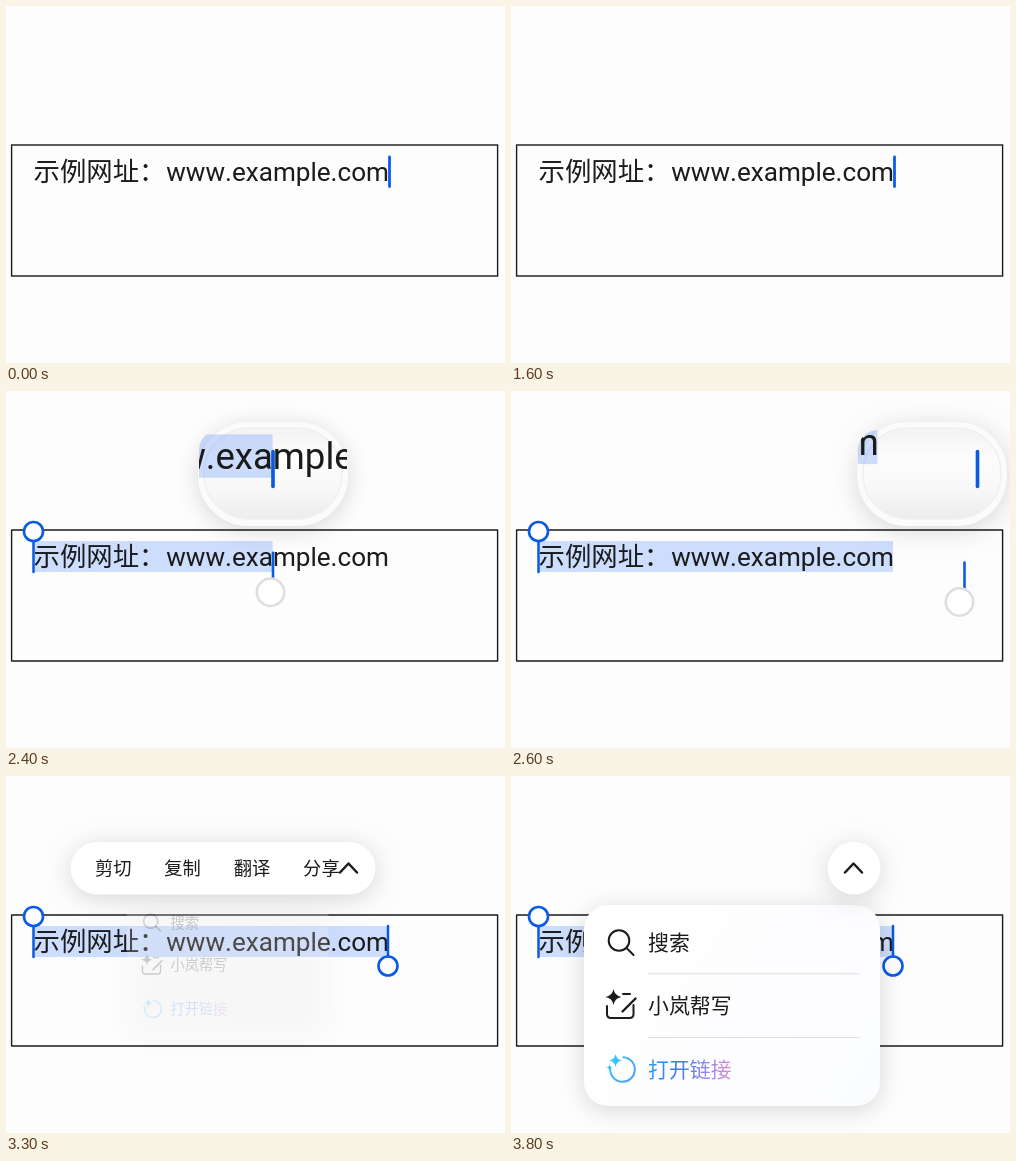
Animation, 499 px wide and 357 px high, one loop 4500 ms. Source, as an HTML page with a canvas:

```html
<!DOCTYPE html>
<html lang="zh">
<head>
<meta charset="utf-8">
<title>文本选择</title>
<style>
html, body { margin: 0; width: 100%; height: 100%; overflow: hidden; background: #fdfdfd; }
canvas { display: block; width: 499px; height: 357px; }
</style>
</head>
<body>
<canvas id="stage"></canvas>
<script>
const W = 499, H = 357, LOOP = 4500;
const BLUE = '#0a5ae6', INK = '#1b1b1b';
const CJK = '"Noto Sans CJK SC", "Noto Sans CJK", sans-serif';
const LATIN = 'Roboto, sans-serif';
const LEFT = 27.5, END = 382;
const LABEL = '示例网址：', LINK = 'www.example.com';

const canvas = document.getElementById('stage');
const c = canvas.getContext('2d');
const dpr = window.devicePixelRatio || 1;
canvas.width = W * dpr;
canvas.height = H * dpr;
c.fontKerning = 'none';

const clamp = (v, a, b) => Math.max(a, Math.min(b, v));
const mix = (a, b, k) => a + (b - a) * k;
const smooth = k => { k = clamp(k, 0, 1); return k * k * (3 - 2 * k); };

function layer(alpha, draw) {
  c.save();
  c.globalAlpha *= alpha;
  draw();
  c.restore();
}

function write(str, x, y, size, family, color = INK, weight = 400) {
  c.font = `${weight} ${size}px ${family}`;
  c.fillStyle = color;
  c.fillText(str, x, y);
}

function line(points, color, width) {
  c.beginPath();
  points.forEach(([x, y]) => c.lineTo(x, y));
  c.strokeStyle = color;
  c.lineWidth = width;
  c.lineCap = c.lineJoin = 'round';
  c.stroke();
}

function pill(x, y, w, h, r) {
  c.beginPath();
  c.roundRect(x, y, w, h, r);
}

function card(x, y, w, h, r, fill = '#fff') {
  layer(1, () => {
    c.shadowColor = 'rgba(0,0,0,0.15)';
    c.shadowBlur = 24 * dpr;
    c.shadowOffsetY = 4 * dpr;
    c.fillStyle = fill;
    pill(x, y, w, h, r);
    c.fill();
  });
}

function ring(x, y, r, color) {
  c.beginPath();
  c.arc(x, y, r, 0, 7);
  c.fillStyle = '#fff';
  c.fill();
  c.strokeStyle = color;
  c.lineWidth = 2.6;
  c.stroke();
}

function sentence() {
  write(LABEL, 27.5, 174.7, 26.4, CJK);
  write(LINK, 160.2, 174.5, 26.1, LATIN);
}

function highlight(end) {
  c.fillStyle = 'rgba(10,89,247,0.2)';
  c.fillRect(27, 150, end - 27, 31);
}

// Right edge of the last character reached by x.
function snap(x) {
  if (x < 160) return 27.5 + 26.4 * Math.max(2, Math.round((x - 27.5) / 26.4));
  c.font = `26.1px ${LATIN}`;
  let edge = 160;
  for (let i = 1; i <= LINK.length; i++) {
    const next = 160 + c.measureText(LINK.slice(0, i)).width;
    if (next <= x) edge = next;
  }
  return x >= END ? END : edge;
}

function startHandle() {
  line([[LEFT, 151], [LEFT, 181]], BLUE, 2.5);
  ring(LEFT, 140.5, 9.5, BLUE);
}

function endHandle(x) {
  line([[x, 150], [x, 180]], BLUE, 2.5);
  ring(x, 190, 9.5, BLUE);
}

function chevron(x, up) {
  const s = up ? 1 : -1;
  line([[x - 8.5, 92 + 4.5 * s], [x, 92 - 4.5 * s], [x + 8.5, 92 + 4.5 * s]], INK, 2.5);
}

function toolbar(left, right, labels, up = false, textAlpha = 1) {
  card(left, 66, right - left, 52.5, 26.2);
  c.save();
  pill(left, 66, right - left, 52.5, 26.2);
  c.clip();
  layer(textAlpha, () => labels.forEach((s, i) =>
    write(s, left + 24.3 + i * 69.4, 98.8, 18.3, CJK, INK, 500)));
  c.restore();
  chevron(right - 27, up);
}

function sparkle(x, y, r, color) {
  c.beginPath();
  c.moveTo(x, y - r);
  for (let i = 1; i <= 4; i++) {
    const a = i * Math.PI / 2 - Math.PI / 2;
    const m = a - Math.PI / 4;
    c.quadraticCurveTo(x + Math.cos(m) * r * 0.2, y + Math.sin(m) * r * 0.2,
      x + Math.cos(a) * r, y + Math.sin(a) * r);
  }
  c.fillStyle = color;
  c.fill();
}

function gradient(x0, y0, x1, y1, ...stops) {
  const g = c.createLinearGradient(x0, y0, x1, y1);
  stops.forEach((s, i) => g.addColorStop(i / (stops.length - 1), s));
  return g;
}

function searchIcon() {
  c.beginPath();
  c.arc(108, 164.5, 10.3, 0, 7);
  c.strokeStyle = INK;
  c.lineWidth = 2;
  c.stroke();
  line([[115.5, 172], [122.5, 179]], INK, 2);
}

function writeIcon() {
  c.beginPath();
  c.moveTo(112, 218);
  c.lineTo(119, 218);
  c.moveTo(122.5, 229);
  c.lineTo(122.5, 238);
  c.quadraticCurveTo(122.5, 242, 118.5, 242);
  c.lineTo(100, 242);
  c.quadraticCurveTo(96, 242, 96, 238);
  c.lineTo(96, 230);
  c.strokeStyle = INK;
  c.lineWidth = 2;
  c.stroke();
  line([[124.5, 222.5], [111.5, 235.5]], INK, 2.4);
  sparkle(102.5, 221, 8, INK);
}

function linkIcon() {
  const g = gradient(98, 282, 124, 304, '#38c8f4', '#4a9cf8');
  c.beginPath();
  c.arc(111.5, 293.5, 12.3, -1.5, 3.2);
  c.strokeStyle = g;
  c.lineWidth = 2;
  c.stroke();
  sparkle(104.5, 284.5, 6.5, '#38c4f4');
  sparkle(98.5, 291.5, 3, '#38c4f4');
}

function menu(scale) {
  c.translate(223, 104);
  c.scale(scale, scale);
  c.translate(-223, -104);
  card(73, 129, 296, 201, 24, gradient(73, 129, 369, 330, '#ffffff', '#fbfcff'));
  line([[137, 197.8], [348, 197.8]], '#dedede', 1);
  line([[137, 261.5], [348, 261.5]], '#dedede', 1);
  searchIcon();
  writeIcon();
  linkIcon();
  write('搜索', 137, 173.8, 20.9, CJK, INK, 500);
  write('小岚帮写', 137, 236.8, 20.9, CJK, INK, 500);
  write('打开链接', 137, 300.5, 20.9, CJK,
    gradient(137, 0, 221, 0, '#2d9ff5', '#3f78f4', '#8e86ee', '#e08fd0'), 500);
}

function lens(cx, cy, end) {
  const mx = clamp(cx, 78, 421), zoom = 1.4;
  card(mx - 75, 31, 150, 104, 50, '#fbfbfb');
  pill(mx - 69, 37, 138, 91, 45);
  c.fillStyle = gradient(0, 37, 0, 128, '#f3f3f3', '#fcfcfc', '#f8f8f8', '#ececec');
  c.fill();
  c.strokeStyle = '#f0f0f0';
  c.lineWidth = 1.5;
  c.stroke();
  c.save();
  pill(mx - 74, 39, 148, 89, 20);
  c.clip();
  c.translate(mx, 78);
  c.scale(zoom, zoom);
  c.translate(-mx, -cy);
  highlight(end);
  sentence();
  line([[cx, cy - 12.5], [cx, cy + 12.5]], BLUE, 2.6);
  c.restore();
}

function caret(t) {
  const alpha = t < 900 || t >= 1600 ? 1 : Math.max(0, 0.92 - (t - 900) / 200);
  layer(alpha, () => line([[383.5, 151], [383.5, 180.5]], '#0a5cf0', 2.8));
}

function word(t) {
  startHandle();
  if (t < 2200) endHandle(80.5);
  if (t >= 1900)
    layer(clamp((t - 1800) / 300, 0, 1), () =>
      toolbar(13, 343, ['剪切', '复制', '全选', '翻译']));
}

function dragSpot(t) {
  const k = smooth((t - 2200) / 400);
  return [mix(80.5, 453.5, k), mix(165, 184.5, k), k];
}

function drag(t, end) {
  const [x, y, k] = dragSpot(t);
  line([[x, y - 13], [x, y + 12]], BLUE, 2.6);
  ring(x - 5 * k, y + 26.5, 13.7, '#dedede');
  if (t >= 2400) lens(x, y, end);
}

function openMenu(t) {
  const p = t >= 3800 ? 1 : 1 - Math.pow(1 - (t - 3270) / 530, 1.6);
  layer(clamp(0.2 + (t - 3300) / 260, 0, 1), () => menu(mix(0.65, 1, p)));
  toolbar(mix(40, 316.5, p), 369.5, ['剪切', '复制', '翻译', '分享'], true,
    clamp(1.2 - 2.2 * p, 0, 1));
}

function render(t) {
  c.setTransform(dpr, 0, 0, dpr, 0, 0);
  c.fillStyle = '#fdfdfd';
  c.fillRect(0, 0, W, H);
  c.strokeStyle = INK;
  c.lineWidth = 1.4;
  c.strokeRect(5.6, 139, 486, 131);

  const dragging = t >= 2200 && t < 2800;
  let end = 0;
  if (t >= 1800) end = t < 2200 ? 80.5 : dragging ? snap(dragSpot(t)[0]) : END;
  if (end) highlight(end);
  sentence();

  if (t < 1800) return caret(t);
  if (t < 2400) word(t);
  else layer(t === 2800 || t === 2900 ? 0.8 : 1, startHandle);
  if (dragging) return drag(t, end);
  if (t < 2800) return;
  layer(t < 3000 ? 0.8 : 1, () => endHandle(END));
  if (t >= 3300) openMenu(t);
  else if (t >= 2900) toolbar(40, 369.5, ['剪切', '复制', '翻译', '分享']);
}

const start = performance.now();
function tick() {
  const t = (performance.now() - start) % LOOP;
  render(Math.floor(t / 100) * 100);
  requestAnimationFrame(tick);
}
tick();
</script>
</body>
</html>
```
